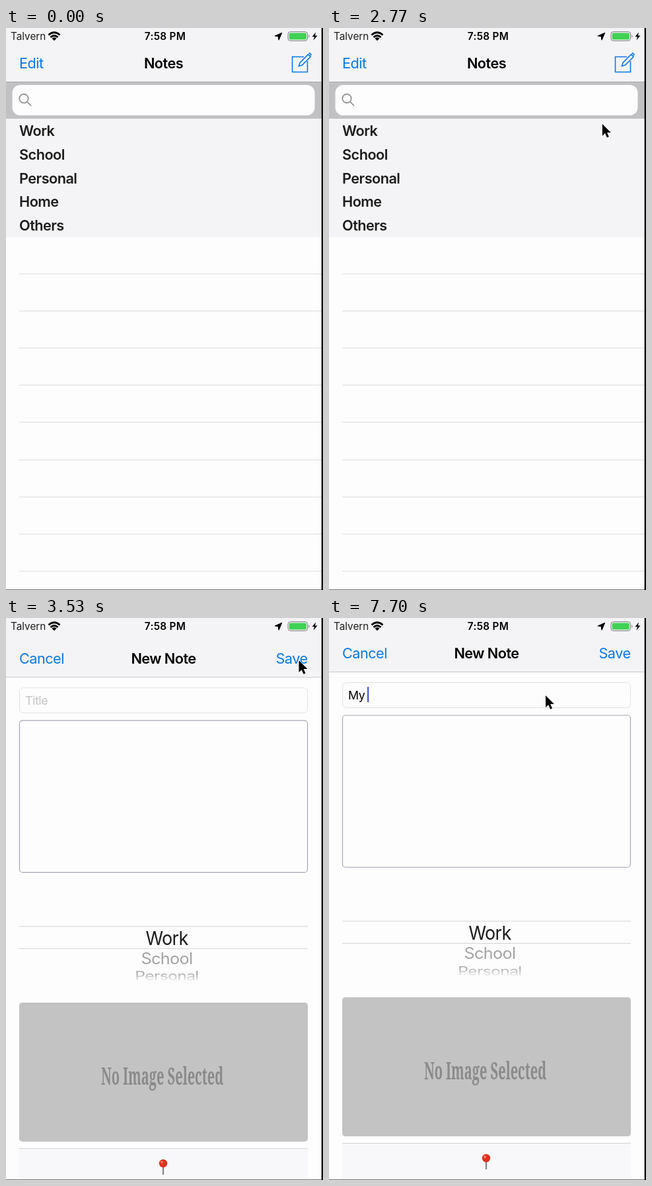
Write an HTML page that moves like this. It is 480 px wide and 849 px high and loops after 8000 ms.

```html
<!DOCTYPE html>
<html lang="en">
<head>
<meta charset="utf-8">
<title>Notes</title>
<style>
  html, body { margin: 0; width: 100%; height: 100%; overflow: hidden; background: #fdfdfd; }
  svg { display: block; width: 480px; height: 849px; }
  text { font: 400 21.7px Inter, "Liberation Sans", sans-serif; letter-spacing: -.025em; }
  .bold { font-weight: 600; }
  .mid { text-anchor: middle; }
  .end { text-anchor: end; }
  .blue { fill: #0b78e6; }
  .small { font-size: 17.85px; white-space: pre; }
  .status { font-size: 15.3px; letter-spacing: 0; }
  .wheel { font-size: 26.5px; }
  .picture { font: 700 36px "Noto Serif", "Liberation Serif", serif; letter-spacing: 0; }
</style>
</head>
<body>
<svg viewBox="0 0 480 849">
  <defs>
    <linearGradient id="fade" x2="0" y2="1">
      <stop offset=".35" stop-color="#acacac"/>
      <stop offset=".85" stop-color="#efefef"/>
    </linearGradient>
  </defs>

  <!-- Notes list -->
  <rect width="480" height="849" fill="#fdfdfd"/>
  <rect width="480" height="316" fill="#f4f4f6"/>
  <rect y="81" width="480" height="56" fill="#c1c1c4"/>
  <path d="M0 81.5H480" stroke="#a9a9ac"/>
  <rect x="9.5" y="86" width="458" height="46" rx="12" fill="#fdfdfd"/>
  <g fill="none" stroke="#8b8b8e" stroke-width="1.7">
    <circle cx="27" cy="106.5" r="6.7"/>
    <path d="M32 111.5L38 117.5"/>
  </g>
  <text class="blue" x="20" y="60.7">Edit</text>
  <text class="bold mid" x="238.5" y="60.7">Notes</text>
  <g id="compose" fill="none" stroke="#0b78e6" stroke-width="1.6">
    <path d="M451 43.5H433.5V66.5H456.5V50M443.5 57.5L445 52.5L457.5 40L461 43.5L448.5 56Z"/>
    <path d="M458.5 39L460 38L462 40L461 42"/>
  </g>
  <g id="list"></g>

  <!-- New note sheet -->
  <g id="sheet">
    <rect width="480" height="860" fill="#fdfdfd"/>
    <rect width="480" height="81" fill="#f4f4f6"/>
    <path d="M0 81.5H480" stroke="#cbcbcf"/>
    <text class="blue" x="20" y="60.7">Cancel</text>
    <text class="bold mid" x="238.5" y="60.7">New Note</text>
    <text class="blue end" x="456.5" y="60.7">Save</text>
    <rect x="20.5" y="97.5" width="436" height="38" rx="6" fill="none" stroke="#e2e2e4"/>
    <text id="hint" class="small" x="29" y="122.7" fill="#c5c5c9">Title</text>
    <text id="entry" class="small" x="29" y="122.7"></text>
    <rect id="caret" y="104" width="2.4" height="23.5" rx="1" fill="#4e5ed0"/>
    <rect x="20.5" y="147" width="436" height="229.5" rx="4.5" fill="none" stroke="#a6a6b4" stroke-width="1.2"/>
    <path d="M20 458H457M20 491.5H457" stroke="#d3d3d6"/>
    <text class="wheel mid" transform="translate(243.5 486) scale(1.02 1.08)" fill="#1c1c1c">Work</text>
    <text class="wheel mid" transform="translate(243.5 515) scale(.95 .9)" fill="#a3a3a5">School</text>
    <text class="wheel mid" transform="translate(243.5 539.5) scale(.93 .68)" fill="url(#fade)">Personal</text>
    <rect x="20" y="573" width="437" height="210" rx="4.5" fill="#c3c3c3"/>
    <text class="picture mid" transform="translate(236.5 696.7) scale(.555 1)" fill="#8a8a8a">No Image Selected</text>
    <rect x="20" y="793" width="437" height="60" fill="#f8f8fa"/>
    <path d="M20 793.5H457" stroke="#d5d5d8"/>
    <path d="M238 820V833" stroke="#85817f" stroke-width="2.2"/>
    <circle cx="238" cy="816" r="6.2" fill="#dc3220"/>
    <circle cx="236" cy="814" r="2" fill="#f4775f"/>
  </g>

  <!-- Status bar -->
  <text class="status" x="7" y="17.8" fill="#1c1c1c">Talvern</text>
  <path d="M64.5 10.5Q73 3 81.5 10.5M67.5 14Q73 9 78.5 14" fill="none" stroke="#000" stroke-width="2.7"/>
  <path d="M69.5 15.7Q73 13 76.5 15.7L73 19.2Z"/>
  <text class="status bold mid" x="241" y="17.8" style="letter-spacing:.02em">7:58 PM</text>
  <path id="arrow" d="M417.5 7.5L413 18L412.3 12.7L407.3 12Z" stroke="#000" stroke-width="1.2" stroke-linejoin="round"/>
  <rect x="427" y="5.7" width="29.5" height="13.6" rx="3.5" fill="none" stroke="#77777a"/>
  <rect x="428.7" y="7.4" width="26.1" height="10.2" rx="2" fill="#40d154"/>
  <path d="M458.3 10Q460.8 12.5 458.3 15Z" fill="#77777a"/>
  <path d="M469 6.5L463.5 13.2H467L465.5 18.5L471.5 11.5H468Z"/>

  <rect y="848" width="480" height="1" fill="#757577"/>
  <rect x="477.7" width="3" height="849"/>
  <path id="cursor" d="M0 0V18L4.2 14.2L7 20.7L10 19.4L7.2 13H13Z" stroke="#fdfdfd" stroke-width="1.2" paint-order="stroke"/>
</svg>
<script>
const LOOP = 8000;
const $ = id => document.getElementById(id);
const clamp = v => Math.min(1, Math.max(0, v));
const ramp = (t, a, b) => clamp((t - a) / (b - a));
const smooth = p => p * p * (3 - 2 * p);

let rows = '';
['Work', 'School', 'Personal', 'Home', 'Others'].forEach((name, i) => {
  rows += `<text class="bold" x="20" y="${163.3 + 35.7 * i}" fill="#1c1c1c">${name}</text>`;
});
for (let i = 0; i < 9; i++) {
  rows += `<path d="M20 ${Math.round(371 + 56.1 * i) + .5}H480" stroke="#dcdcdf"/>`;
}
$('list').innerHTML = rows;

// Pointer stops: time, x, y
const stops = [
  [30, 478, 300], [800, 372, 340], [2130, 334, 327], [2450, 345, 305],
  [2980, 450, 61], [3430, 450, 61], [4150, 328, 117]
];

function pointer(t) {
  const i = stops.findIndex(s => s[0] > t);
  if (i < 0) return stops.at(-1).slice(1);
  const [a, x, y] = stops[Math.max(0, i - 1)], [b, u, v] = stops[i];
  const p = smooth(ramp(t, a, b));
  return [x + (u - x) * p, y + (v - y) * p];
}

// Critically damped spring from the bottom edge
function sheetY(t) {
  const x = Math.max(0, t - 3162) * .0182;
  return x > 11 ? 0 : 849 * (1 + x) * Math.exp(-x);
}

const full = 'My Note';
const keys = [5900, 6020, 6140, 6230, 6350, 6700, 6870];
const erases = [7160, 7340, 7520, 7680];
const count = (times, t) => times.filter(k => k <= t).length;

function draw(t) {
  const [x, y] = pointer(t);
  $('cursor').setAttribute('transform', `translate(${x} ${y})`);
  $('cursor').style.display = t < 30 ? 'none' : '';
  $('arrow').setAttribute('fill', t >= 1400 && t < 2450 ? 'none' : '#000');
  $('compose').setAttribute('opacity', t < 3080 ? 1 : .4 + .6 * ramp(t, 3130, 3500));
  $('sheet').setAttribute('transform', `translate(0 ${sheetY(t)})`);

  const text = full.slice(0, count(keys, t) - count(erases, t));
  $('entry').textContent = text;
  $('hint').style.display = text ? 'none' : '';
  $('caret').setAttribute('x', 28 + (text ? $('entry').getComputedTextLength() : 0));
  const blink = 1 - ramp(t, 5100, 5300) + ramp(t, 5430, 5630);
  $('caret').setAttribute('opacity', t < 4640 ? 0 : blink);
}

const start = performance.now();
function tick() {
  draw((performance.now() - start) % LOOP);
  requestAnimationFrame(tick);
}
tick();
</script>
</body>
</html>
```
